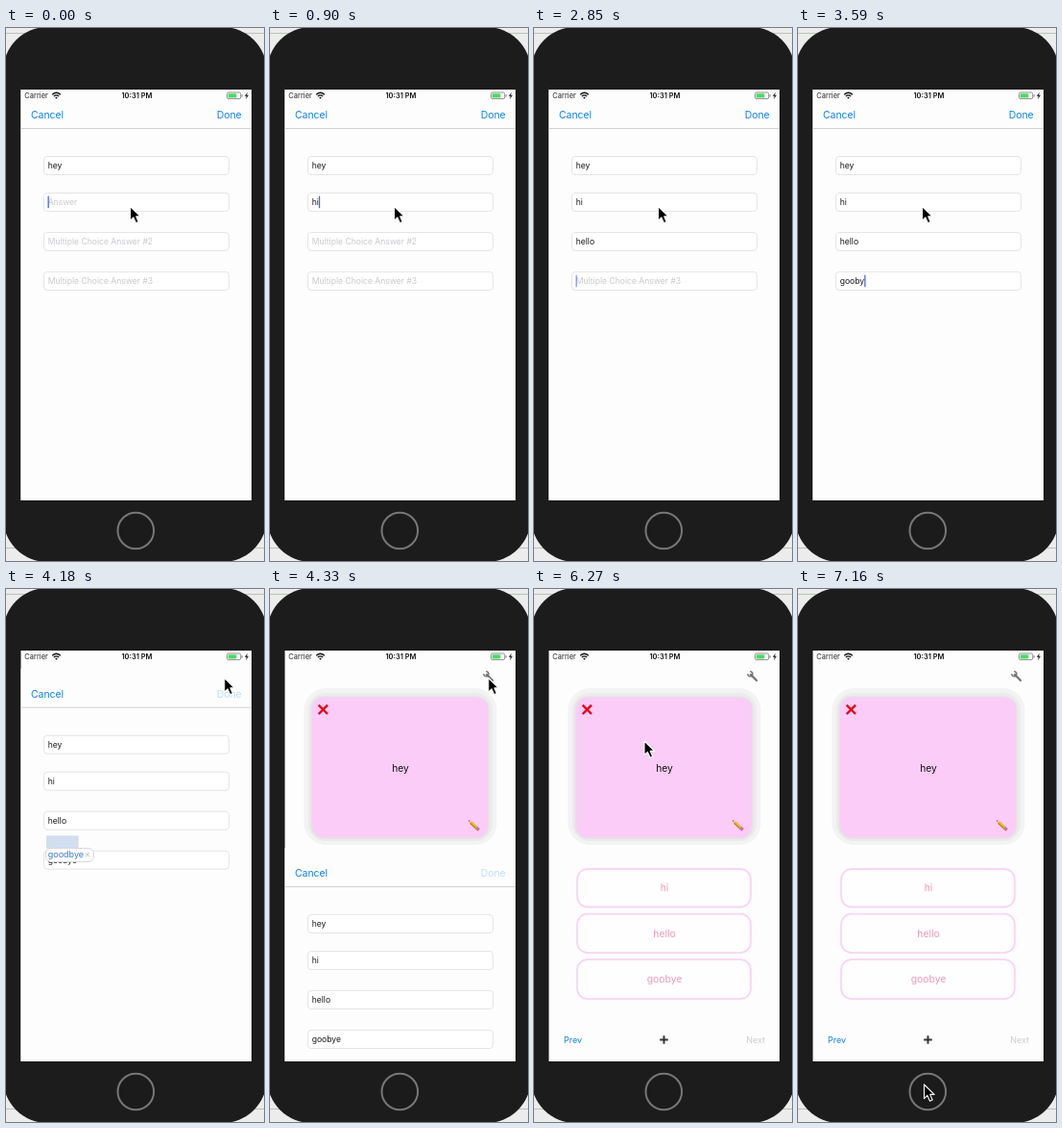
An HTML page that plays this animation: 269 by 554 pixels, repeating every 8 s.

```html
<!DOCTYPE html>
<html lang="en">
<head>
<meta charset="utf-8">
<title>Quiz card editor</title>
<style>
html, body { margin: 0; width: 100%; height: 100%; overflow: hidden; }
svg { display: block; width: 269px; height: 554px; font-family: Inter, Roboto, sans-serif; }
.blue { fill: #1480ee; }
.mid { text-anchor: middle; }
.end { text-anchor: end; }
.field rect { fill: #fff; stroke: #e5e5e5; }
.field text { font-size: 8.6px; white-space: pre; }
.choice rect { fill: #fefefe; stroke: #f7d5f5; stroke-width: 1.8; }
.choice text { fill: #ec9ab7; font-size: 10.4px; }
</style>
</head>
<body>
<svg viewBox="0 0 269 554">
  <defs>
    <clipPath id="screen"><rect x="15.5" y="64" width="240.5" height="427"/></clipPath>
  </defs>

  <rect width="269" height="554" fill="#ececec"/>
  <path d="M0 5.5H269M0 540.5H269" stroke="#b9c2b9"/>
  <rect x="-3" y="-1" width="275" height="556" rx="46" fill="#1c1c1c"/>
  <circle cx="135.3" cy="522.5" r="18.8" fill="#1b1b1b" stroke="#777" stroke-width="2"/>

  <g clip-path="url(#screen)">
    <rect x="15" y="64" width="242" height="428" fill="#fdfdfd"/>

    <g id="deck">
      <g transform="translate(222 85)" fill="none" stroke="#777">
        <path d="M4 4L10 10" stroke-width="2.4" stroke-linecap="round"/>
        <path d="M3.2 .8A2.5 2.5 0 1 1 .9 3.1" stroke-width="1.6"/>
      </g>
      <rect x="35.5" y="103" width="201" height="163" rx="23" fill="#f3f3f3"/>
      <rect x="40" y="108" width="192" height="154" rx="18" fill="#ebebeb"/>
      <rect x="42.5" y="111.5" width="186" height="148.5" rx="14" fill="#e9dee8"/>
      <rect x="44" y="113" width="183" height="145" rx="12" fill="#fbccf8"/>
      <path d="M50.7 120.7L60 130M60 120.7L50.7 130" stroke="#e30613" stroke-width="2.4"/>
      <text class="mid" x="136" y="190" font-size="10.3" fill="#111">hey</text>
      <g transform="translate(207 240.5) rotate(43)">
        <path d="M0 0L3 -1.7V1.7Z" fill="#e9c08c"/>
        <path d="M0 0L1.2 -.7V.7Z" fill="#333"/>
        <rect x="3" y="-1.8" width="8" height="3.6" fill="#efb432"/>
        <path d="M3 1H11" stroke="#b57b25"/>
        <rect x="11" y="-1.8" width="1.6" height="3.6" fill="#8a9298"/>
        <rect x="12.6" y="-1.8" width="2" height="3.6" rx=".8" fill="#dc6477"/>
      </g>
      <g id="choices"></g>
      <text class="blue" x="31" y="472" font-size="9">Prev</text>
      <path d="M131.2 468.5H139.8M135.5 464.2V472.8" stroke="#333" stroke-width="2"/>
      <text class="end" x="241" y="472" font-size="9" fill="#ccc">Next</text>
    </g>

    <g id="sheet">
      <rect x="15" y="64" width="242" height="428" fill="#fdfdfd"/>
      <path d="M15 104.5H257" stroke="#d2d2d2"/>
      <text class="blue" x="26" y="94.3" font-size="10.4">Cancel</text>
      <text id="done" class="blue end" x="245.7" y="94.3" font-size="10.4">Done</text>
      <g id="fields"></g>
      <rect id="caret" width="1.3" height="12.5" fill="#4668e0"/>
    </g>

    <g id="suggestion">
      <rect x="42" y="256.3" width="33.5" height="13.5" fill="#82a6d6" fill-opacity=".36"/>
      <rect x="41.5" y="269.5" width="50" height="14" rx="5.5" fill="#fff" stroke="#d8d8d8"/>
      <text x="43.8" y="279.4" font-size="9" fill="#3b7bd8">goodbye</text>
      <path d="M82.7 274L87 278.3M87 274L82.7 278.3" stroke="#bbb" stroke-width=".9"/>
    </g>

    <text x="19.3" y="73.2" font-size="7.5" fill="#222">Carrier</text>
    <g fill="none" stroke="#111" stroke-width="1.3">
      <path d="M48.2 69.3Q52.5 65.3 56.8 69.3M49.8 71.1Q52.5 68.7 55.2 71.1"/>
      <path d="M51.1 72.2L52.5 73.8L53.9 72.2Q52.5 71.3 51.1 72.2Z" fill="#111" stroke="none"/>
    </g>
    <text class="mid" x="136.5" y="73.2" font-size="7.5" font-weight="600" fill="#111">10:31 PM</text>
    <rect x="230.5" y="67" width="14.2" height="6.6" rx="1.6" fill="#fff" stroke="#777" stroke-width=".8"/>
    <rect x="231.7" y="68.2" width="8.6" height="4.2" rx=".6" fill="#4cd964"/>
    <path d="M246 69.2V71.5" stroke="#777" stroke-width="1.1"/>
    <path d="M251.8 66.8L248.8 70.8H250.7L250 74L253 69.8H251.1Z" fill="#222"/>
  </g>

  <path id="pointer" d="M0 0V14.6L3.4 11.4L6 17.2L8.7 16L6.2 10.4H10.6Z"
        fill="#000" stroke="#fff" stroke-width="1.1" stroke-linejoin="round"/>
</svg>

<script>
const LOOP = 8000;
const $ = id => document.getElementById(id);

function add(parent, tag, attrs, text = "") {
  const node = document.createElementNS("http://www.w3.org/2000/svg", tag);
  for (const key in attrs) node.setAttribute(key, attrs[key]);
  node.textContent = text;
  return parent.appendChild(node);
}

// Each field: top edge, placeholder, typed word and the time of each letter.
const fields = [
  { y: 133.5, word: "hey", keys: [0, 0, 0] },
  { y: 171.5, hint: "Answer", word: "hi", keys: [450, 900], focus: 0, blur: 1050 },
  { y: 212.5, hint: "Multiple Choice Answer #2", word: "hello",
    keys: [1350, 1650, 1950, 2100, 2250], focus: 1050, blur: 2400 },
  { y: 253.5, hint: "Multiple Choice Answer #3", word: "goobye",
    keys: [2990, 3140, 3290, 3440, 3590, 3740], focus: 2400, blur: 3880 }
];
for (const field of fields) {
  const group = add($("fields"), "g", { class: "field" });
  add(group, "rect", { x: 39.5, y: field.y, width: 193, height: 19, rx: 3.5 });
  field.label = add(group, "text", { x: 43.7, y: field.y + 12.7 });
}

[["hi", 291, 39.5], ["hello", 337.7, 40.5], ["goobye", 385.2, 41]].forEach(([word, y, height]) => {
  const group = add($("choices"), "g", { class: "choice" });
  add(group, "rect", { x: 45, y, width: 181, height, rx: 11 });
  add(group, "text", { class: "mid", x: 136, y: y + height / 2 + 3.6 }, word);
});

// Stepped tracks: [start time, ...values]
const pointerTrack = [
  [0, 129.5, 185.5], [3880, 228, 99], [4030, 227.7, 92.5], [4770, 229.7, 300.5],
  [5370, 222, 345], [5520, 215.5, 380], [5820, 215, 318], [5970, 226, 201],
  [6270, 115, 158], [6570, 96, 235], [6720, 91.5, 340], [6870, 102, 430],
  [7020, 121, 492], [7160, 131.5, 515]
];
const sheetTrack = [[0, 0], [4180, 18.7], [4330, 205], [4480, 400], [4630, 430]];

const at = (track, time) => track.findLast(step => step[0] <= time);

function drawField(field, time) {
  const typed = field.word.slice(0, field.keys.filter(key => key <= time).length);
  field.label.textContent = typed || field.hint;
  field.label.setAttribute("fill", typed ? "#1a1a1a" : "#c9c9ce");
  if (time >= field.focus && time < field.blur) {
    const x = typed ? 43.7 + field.label.getComputedTextLength() : 43.5;
    $("caret").setAttribute("x", x);
    $("caret").setAttribute("y", field.y + 3.2);
    $("caret").setAttribute("opacity", time >= 2850 && time < 2990 ? 0.65 : 1);
  }
}

function render(time) {
  fields.forEach(field => drawField(field, time));
  if (time >= 3880) $("caret").setAttribute("opacity", 0);
  $("done").setAttribute("opacity", time >= 4030 ? 0.25 : 1);
  $("sheet").setAttribute("transform", `translate(0 ${at(sheetTrack, time)[1]})`);
  $("suggestion").setAttribute("visibility", time >= 3880 && time < 4330 ? "visible" : "hidden");
  const [, x, y] = at(pointerTrack, time);
  $("pointer").setAttribute("transform", `translate(${x} ${y})`);
}

const start = performance.now();
function tick() {
  render((performance.now() - start) % LOOP);
  requestAnimationFrame(tick);
}
tick();
</script>
</body>
</html>
```
